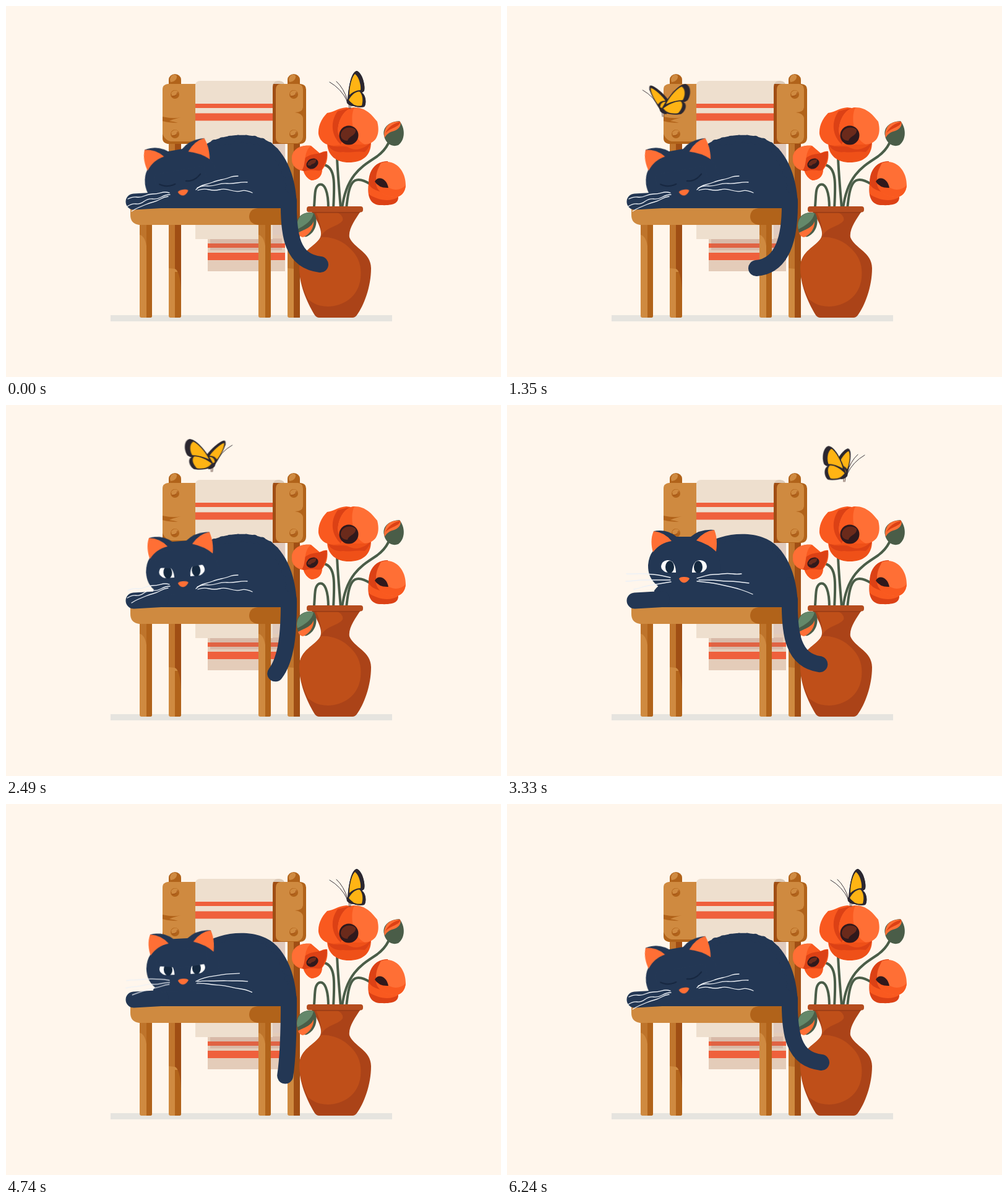
An HTML page without scripts for the animation above (6.27 s loop, 800 by 600 pixels).

```html
<!DOCTYPE html>
<html lang="en">
<head>
<meta charset="utf-8">
<title>Cat, poppies and butterfly</title>
<style>
html, body { margin: 0; width: 100%; height: 100%; overflow: hidden; background: #fff6ec; }
svg { display: block; width: 100vw; height: 100vh; }

.loop { animation: 6270ms linear infinite; }
.navy { fill: #233754; }
.wood { fill: #cf8a40; }
.brown { fill: #b1631a; }
.deep { fill: #a04e14; }
.stripe { fill: #ef603c; }
.orange { fill: #ff6f35; }
.red { fill: #f9591f; }
.crimson { fill: #dc4115; }
.seed { fill: #30191c; }
.line { fill: none; stroke-linecap: round; stroke-linejoin: round; }
.stem { stroke: #4a5d48; stroke-width: 4; }

/* cat */
.head { transform-origin: 286px 283px; animation-name: head; }
@keyframes head {
  0%, 24% { transform: translateY(19px) rotate(-10deg); }
  39.7% { transform: translateY(7px) rotate(-4.5deg); }
  49%, 67% { transform: none; }
  86.1% { transform: translateY(10px) rotate(-6.5deg); }
  96%, 100% { transform: translateY(19px) rotate(-10deg); }
}
.sink { animation-name: sink; }
@keyframes sink {
  0%, 24% { transform: translateY(19px); }
  39.7% { transform: translateY(7px); }
  49%, 67% { transform: none; }
  86.1% { transform: translateY(10px); }
  96%, 100% { transform: translateY(19px); }
}
.lids { animation-name: lids; }
@keyframes lids {
  0%, 27% { transform: translateY(24px); }
  39.7% { transform: translateY(5px); }
  46%, 59% { transform: none; }
  64.6% { transform: translateY(5px); }
  86.1% { transform: translateY(10px); }
  95%, 100% { transform: translateY(24px); }
}
.lash { animation-name: lash; }
@keyframes lash {
  0%, 27% { opacity: 1; }
  31%, 90% { opacity: 0; }
  95%, 100% { opacity: 1; }
}
.whisker { stroke: #edf1f6; stroke-width: 1.3; animation-name: whisker; }
@keyframes whisker {
  0%, 40% { d: var(--wavy); }
  50%, 70% { d: var(--calm); }
  84%, 100% { d: var(--wavy); }
}
.fur { stroke: #233754; stroke-width: 14; stroke-dasharray: 0 13; animation-name: fur; }
@keyframes fur {
  0%, 40% { stroke-width: 14px; }
  50%, 70% { stroke-width: 9px; }
  84%, 100% { stroke-width: 14px; }
}
.tail {
  --right: path("M457 315C456 372 463 413 508 418");
  --down: path("M457 315C457 367 457 405 456 441");
  --left: path("M457 315C458 372 447 420 403 424");
  stroke: #233754; stroke-width: 26; animation-name: tail;
}
@keyframes tail {
  0% { d: var(--right); animation-timing-function: cubic-bezier(.12, 0, .39, 0); }
  11% { d: var(--down); animation-timing-function: cubic-bezier(.61, 1, .88, 1); }
  21.5% { d: var(--left); animation-timing-function: cubic-bezier(.12, 0, .39, 0); }
  46% { d: var(--down); animation-timing-function: cubic-bezier(.4, .9, .7, 1); }
  56% { d: var(--right); animation-timing-function: linear; }
  63.5% { d: var(--right); animation-timing-function: cubic-bezier(.12, 0, .39, 0); }
  75% { d: var(--down); animation-timing-function: cubic-bezier(.61, 1, .88, 1); }
  86% { d: var(--left); animation-timing-function: cubic-bezier(.12, 0, .39, 0); }
  93% { d: var(--down); animation-timing-function: cubic-bezier(.61, 1, .88, 1); }
  99.5%, 100% { d: var(--right); }
}

/* butterfly */
.fly-x { animation-name: fly-x; }
@keyframes fly-x {
  0% { transform: translateX(552px); animation-timing-function: cubic-bezier(.4, 0, .75, .8); }
  21.5% { transform: translateX(249px); animation-timing-function: cubic-bezier(.2, .6, .6, 1); }
  30% { transform: translateX(208px); animation-timing-function: cubic-bezier(.5, 0, .75, .65); }
  39.7% { transform: translateX(336px); animation-timing-function: cubic-bezier(.3, .4, .7, 1); }
  53.1% { transform: translateX(549px); animation-timing-function: ease-in-out; }
  59.3%, 100% { transform: translateX(552px); }
}
.fly-y { animation-name: fly-y; }
@keyframes fly-y {
  0% { transform: translateY(156px); animation-timing-function: ease-in-out; }
  10% { transform: translateY(74px); animation-timing-function: ease-in-out; }
  21.5% { transform: translateY(169px); animation-timing-function: ease-in-out; }
  30% { transform: translateY(160px); animation-timing-function: ease-in; }
  39.7% { transform: translateY(98px); animation-timing-function: ease-out; }
  45% { transform: translateY(86px); animation-timing-function: ease-in-out; }
  53.1% { transform: translateY(114px); animation-timing-function: ease-in-out; }
  59.3%, 100% { transform: translateY(156px); }
}
.turn { animation-name: turn; animation-timing-function: step-end; }
@keyframes turn {
  0% { transform: none; }
  30% { transform: scaleX(-1); }
  57.5%, 100% { transform: none; }
}
.flying { animation-name: flying; animation-timing-function: step-end; }
.resting { animation-name: resting; animation-timing-function: step-end; }
@keyframes flying { 0% { opacity: 0; } .4% { opacity: 1; } 59.3%, 100% { opacity: 0; } }
@keyframes resting { 0% { opacity: 1; } .4% { opacity: 0; } 59.3%, 100% { opacity: 1; } }
.beat { animation: 95ms ease-in-out -50ms infinite alternate; }
.near { animation-name: near; }
.far { animation-name: far; }
@keyframes near {
  from { transform: skewX(-6deg) scale(1.1, 1); }
  to { transform: skewX(-28deg) scale(1.35, .82); }
}
@keyframes far {
  from { transform: skewX(8deg) scale(.9, .9); }
  to { transform: skewX(40deg) scale(.9, .78); }
}
.fold-near { animation-name: fold-near; }
.fold-far { animation-name: fold-far; }
@keyframes fold-near {
  0% { transform: none; }
  59.3%, 65% { transform: skewX(-6deg) scale(1.2, 1); }
  74%, 100% { transform: none; }
}
@keyframes fold-far {
  0% { transform: none; }
  59.3%, 65% { transform: skewX(12deg) scale(.9, .94); }
  74%, 100% { transform: none; }
}
</style>
</head>
<body>
<svg viewBox="0 0 800 600" aria-label="A cat dozing on a chair while a butterfly visits">
<defs>
  <g id="back-leg">
    <path class="wood" d="M0 223H20V501Q20 504 17 504H3Q0 504 0 501Z"/>
    <path class="brown" d="M10 430H20V501Q20 504 17 504H10Z"/>
    <path class="deep" d="M10 223H20V460Q18 428 10 425Z"/>
    <path class="brown" d="M0 223H10V425L0 424Z" opacity=".5"/>
  </g>
  <g id="front-leg">
    <path class="wood" d="M0 350H20V501Q20 504 17 504H3Q0 504 0 501Z"/>
    <path class="brown" d="M11 350H20V501Q20 504 17 504H11Z"/>
    <path class="brown" d="M0 350H12V396Q10 372 0 370Z" opacity=".55"/>
  </g>
  <g id="knob">
    <path class="brown" d="M-10 127V119A10 9 0 0 1 10 119V127Z"/>
    <path class="wood" d="M-8 119C-7 111 0 109 3 113C4 119 -2 123 -7 123Z"/>
  </g>
  <g id="screw">
    <circle class="brown" r="7"/>
    <path class="wood" d="M-6 -2C-4 -7 3 -8 5 -4C5 1 0 3 -5 2Z"/>
    <path class="line" stroke="#a04e14" d="M-4 3Q3 3 4 -3"/>
  </g>
  <g id="wing">
    <path fill="#2b2730" d="M0 0C1 -25 6 -50 15 -51C24 -48 29 -27 27 -19Q25 -16 23 -16C30 -12 31 3 27 7C20 9 7 7 0 0Z"/>
    <path fill="#ffb414" d="M3 -12C3 -28 8 -43 12 -46C19 -41 22 -26 21 -20C15 -20 8 -17 3 -12Z"/>
    <path fill="#ffb414" d="M2 -4C7 -14 16 -19 20 -17C25 -11 25 -2 23 5C15 7 8 4 2 -4Z"/>
  </g>
</defs>

<path fill="#e6e4df" d="M169 500H624V510H169Z"/>

<!-- chair -->
<use href="#back-leg" x="263"/>
<use href="#knob" x="273"/>
<use href="#knob" x="465"/>
<path fill="#e0cbbf" d="M431 200H451V395H431Z"/>
<path fill="#e4ccb9" d="M326 370H451V429H326Z"/>
<path class="stripe" d="M326 384H451V391H326ZM326 399H451V411H326Z"/>
<path fill="#a56d66" opacity=".2" d="M330 376H446V395H330Z"/>
<use href="#back-leg" x="455"/>
<path class="deep" d="M465 223H475V504H465Z"/>
<path class="wood" d="M262 126H320V223H262Q253 222 253 213V135Q253 127 262 126Z"/>
<path class="brown" d="M253 179Q270 183 282 180Q267 184 264 186Q272 187 278 189Q262 189 253 186ZM253 207Q257 217 266 219H306V223H262Q253 222 253 213Z"/>
<path fill="#dccab8" d="M425 121H442Q451 122 451 131V150H425Z"/>
<path class="brown" d="M431 126H476Q485 127 485 135V213Q485 222 476 223H431Z"/>
<path class="deep" d="M431 126H441Q436 128 436 136V214Q436 220 442 223H431Z"/>
<path class="wood" d="M444 126H472Q480 127 480 135V164Q479 172 467 172Q479 174 480 181V212Q479 220 471 222H445Q436 221 436 213V135Q436 127 444 126Z"/>
<use href="#screw" x="273" y="143"/>
<use href="#screw" x="273" y="207"/>
<use href="#screw" x="465" y="143"/>
<use href="#screw" x="465" y="207"/>
<path fill="#eedfce" d="M314 121H439Q431 122 431 131V377H306V129Q306 121 314 121Z"/>
<path class="stripe" d="M306 158H431V165H306ZM306 173.500H431V185.500H306Z"/>
<use href="#front-leg" x="216"/>
<use href="#front-leg" x="408"/>
<path class="wood" d="M201 327H447V354H215Q201 352 201 338Z"/>
<path class="brown" d="M393 340Q394 328 407 327H447V354H407Q393 352 393 340Z"/>

<!-- stems and vase -->
<g class="line stem">
  <path d="M541 328C538 290 536 270 535 245"/>
  <path d="M529 328C531 290 533 262 515 257"/>
  <path d="M521 328C521 300 515 286 506 289C496 294 501 315 496 338"/>
  <path d="M550 328C554 290 558 268 590 289"/>
  <path d="M543 328C550 270 580 257 600 243Q612 234 618 222"/>
</g>
<path fill="#ab4318" d="M494 332C505 350 512 365 508 374C500 390 474 395 474 424C474 455 490 485 499 500Q502 504 506 504H560Q564 504 567 500C578 485 590 455 590 424C590 398 562 392 555 374C553 360 565 345 573 332Z"/>
<path fill="#bf4f19" d="M509 374C525 372 545 380 557 393C570 406 575 420 573 440C570 470 545 486 520 486C505 486 495 480 488 474C480 457 474 440 474 424C474 395 500 390 509 374Z"/>
<path fill="#bf4f19" d="M501 334H536Q546 340 544 347C537 357 514 358 509 374C511 362 508 350 501 334Z"/>
<rect x="486" y="324" width="91" height="9.500" rx="4" fill="#b44c1e"/>
<path fill="#8f3714" opacity=".6" d="M494 333H573L571 335H496Z"/>

<!-- buds -->
<path fill="#4a5d48" d="M470 352C471 338 484 331 498 335C505 346 502 366 486 373C474 375 469 364 470 352Z"/>
<path fill="#64886a" d="M470 355C471 339 483 332 497 335C494 349 482 355 471 361Z"/>
<path class="orange" d="M472 367C480 362 494 359 497 348C498 360 489 371 480 374Q474 373 472 367Z"/>
<path fill="#4a5d48" d="M611 210C608 197 618 187 636 186C645 197 646 216 634 225C624 229 613 222 611 210Z"/>
<path class="orange" d="M613 199C617 190 626 186 637 187C640 194 633 201 624 203C618 205 614 209 612 213Q610 206 613 199Z"/>
<path class="crimson" d="M637 187C637 196 622 196 613 206Q619 192 637 187Z"/>

<!-- large poppy -->
<path fill="#ef5018" d="M519 218C518 243 535 253 554 253C574 253 590 244 590 220L555 205Z"/>
<path class="crimson" d="M519 222C530 232 545 223 556 230C568 235 580 230 590 220Q588 228 580 236C566 234 558 238 545 236C533 238 523 232 519 222Z"/>
<path class="red" d="M505 207C504 194 510 182 519 173C530 172 536 165 550 164L565 166L548 222C525 230 508 224 505 207Z"/>
<path class="crimson" d="M536 170C523 188 526 210 541 224L552 200L556 165Z"/>
<path class="orange" d="M537 207C534 188 546 165 563 164C582 164 592 177 600 187C606 210 596 224 578 224C562 222 548 228 537 207Z"/>
<path class="red" d="M563 164C555 180 560 215 580 224C563 224 546 226 537 207C534 188 546 165 563 164Z"/>
<circle class="seed" cx="554" cy="209" r="15.500"/>
<path fill="#6b2a1b" d="M541 210C541 197 556 193 565 200C566 210 554 210 552 218Q543 218 541 210Z"/>

<!-- left poppy -->
<path class="red" d="M462 248C461 232 476 224 493 226Q500 232 507 238Q514 234 519 235C521 250 516 258 511 265C511 274 505 281 494 282C486 279 483 271 481 267C469 265 462 258 462 248Z"/>
<path class="crimson" d="M519 235C519 249 514 258 510 265C498 272 488 268 481 267C474 262 474 256 480 249C490 238 502 240 507 238Z"/>
<path class="orange" d="M462 248C461 232 476 224 493 226C480 236 486 254 478 266C468 264 462 257 462 248Z"/>
<path class="red" d="M481 268C492 263 501 267 510 266C511 274 505 281 494 282C486 279 483 273 481 268Z"/>
<ellipse class="seed" cx="495" cy="255" rx="10" ry="8" transform="rotate(-30 495 255)"/>
<path fill="#6b2a1b" d="M487 257Q489 248 501 248Q502 254 494 256Q492 260 487 257Z"/>

<!-- right poppy -->
<path class="crimson" d="M586 287C586 262 600 251 617 251L634 309C634 318 628 323 606 322C590 322 583 310 586 287Z"/>
<path class="red" d="M586 288C593 301 612 300 634 309C620 318 600 314 586 304Z"/>
<path class="orange" d="M606 254C624 246 646 262 646 290C645 302 638 308 631 309C612 309 598 300 598 280C598 268 603 260 606 254Z"/>
<path class="red" d="M619 294C630 300 640 296 646 290C645 302 638 308 631 309C612 309 600 300 598 288Z"/>
<path class="seed" d="M596 284C601 274 615 278 618 294Q603 295 596 284Z"/>

<!-- cat -->
<path class="loop line tail" d="M457 315C456 372 463 413 508 418"/>
<path class="navy" d="M238 327V300Q247 288 265 280L300 240Q326 219 345 214C366 207 395 207 413 214C450 226 470 275 470 327Z"/>
<path class="loop line fur" d="M337 223Q362 214 388 215.500Q415 216 431 232Q453 256 459 300"/>
<path class="line" stroke="#233754" stroke-width="26" d="M206.500 316.500L250 314"/>
<g class="loop head">
  <path class="navy" d="M237 204Q258 200 274 213H297Q312 200 335 202L338 237Q352 262 340 290L310 298H258Q249 298 243 292C231 282 228 272 228 259Q229 245 236 236Z"/>
  <g fill="#fff">
    <path d="M249 261C250 253 256 251 261 251C270 252 273 262 273 271L257 270.500Q249 267 249 261Z"/>
    <path d="M323 261C322 253 316 251 311 251C302 252 299 262 299 271L315 270.500Q323 267 323 261Z"/>
  </g>
  <g fill="#14283f">
    <ellipse cx="263" cy="262" rx="7" ry="10"/>
    <ellipse cx="309" cy="262" rx="7" ry="10"/>
  </g>
  <path class="loop lids navy" d="M245 222H327V248L292 252H280L245 248Z"/>
  <path class="orange" d="M237 204C232 215 233 228 236 238Q247 223 266 220Q255 206 237 204ZM335 202Q318 204 306 219Q326 225 338 237Q341 216 335 202Z"/>
  <path class="loop lash line" stroke="#15253e" stroke-width="2" d="M251 263Q262 271 276 267M294 265Q307 269 319 258"/>
  <path class="orange" d="M278 281Q279 278 286 278Q294 278 295 281Q291 287 286 287.500Q281 287 278 281Z"/>
</g>
<g class="line">
  <g class="loop sink">
    <path class="loop whisker" style="--wavy:path('M264 283q-7 -2 -14 0t-13 2t-13 3t-13 2t-14 3');--calm:path('M264 279q-7 -1.500 -14 -3t-14 -2t-14 -1t-14 0t-15 0')"/>
    <path class="loop whisker" style="--wavy:path('M265 286q-7 0 -14 4t-14 3t-14 4t-13 4t-14 4');--calm:path('M264 283q-7 0 -14 0t-14 0t-14 0t-15 1t-15 1')"/>
    <path class="loop whisker" style="--wavy:path('M262 289q-6 .5 -12 4t-12 5t-12 4t-12 5t-11 6');--calm:path('M265 286q-6 1 -12 2t-12 2t-12 2t-12 3t-12 3')"/>
  </g>
  <path class="loop whisker" style="--wavy:path('M307 297q6 -6 14 -8t13 -4t14 -4t14 -4t13 -2');--calm:path('M307 280q7 -2 14 -4t14 -2t14 -1t15 0t15 0')"/>
  <path class="loop whisker" style="--wavy:path('M309 294q8 -3.500 16 -3t16 -2t16 -2t17 -1t16 -1');--calm:path('M310 283q8 0 16 0t16 1t16 1t16 1t17 2')"/>
  <path class="loop whisker" style="--wavy:path('M310 298q9 -3 18 -1t17 0t18 1t17 1t18 3');--calm:path('M307 285q9 1 18 2t18 3t18 4t18 5t18 7')"/>
</g>

<!-- butterfly -->
<g class="loop fly-x"><g class="loop fly-y"><g class="loop turn">
  <path class="line" stroke="#3a343a" d="M-1 -3Q-10 -22 -29 -33M0 -3Q-6 -23 -18 -34"/>
  <path class="line" stroke="#5a4038" d="M2 2L3 10M5 2L5 10"/>
  <g class="loop flying">
    <g class="beat far"><use href="#wing"/></g>
    <g class="beat near"><use href="#wing"/></g>
  </g>
  <g class="loop resting">
    <g class="loop fold-far"><use href="#wing"/></g>
    <g class="loop fold-near"><use href="#wing"/></g>
  </g>
  <path fill="#2b2730" d="M-2 -4Q1 -7 3 -2Q9 2 10 6Q3 6 -1 1Z"/>
</g></g></g>
</svg>
</body>
</html>
```
